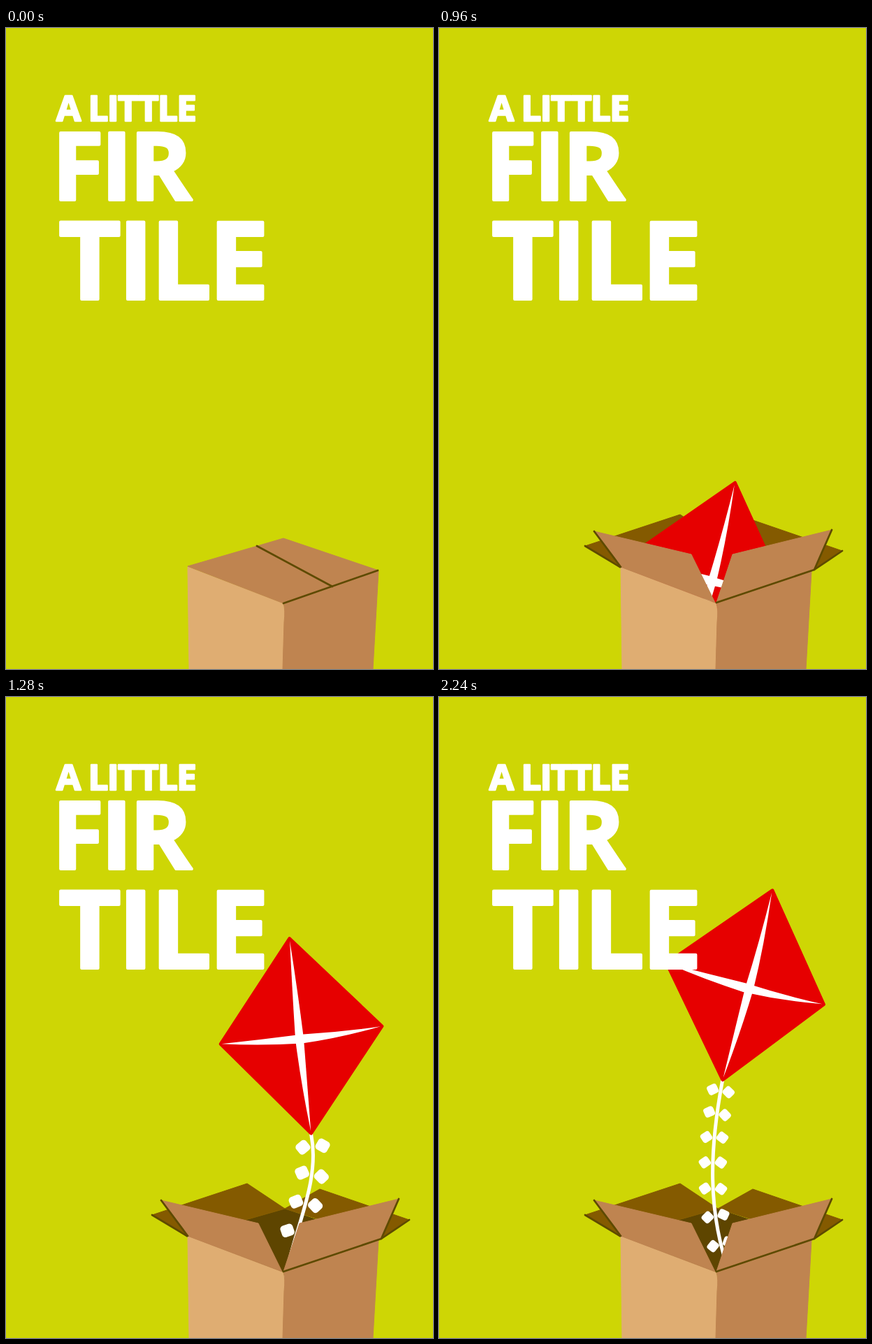
An HTML page for the animation above (2320 ms loop, 611 px wide and 917 px high).

```html
<!DOCTYPE html>
<html lang="en">
<head>
<meta charset="utf-8">
<title>Box and kite</title>
<style>
  html, body { margin: 0; width: 100%; height: 100%; overflow: hidden; background: #ced605; }
  svg { display: block; width: 100vw; height: 100vh; }
  text {
    font-family: "Open Sans", "Noto Sans", sans-serif; font-weight: 700; letter-spacing: -.03em;
    fill: #fff; stroke: #fff; stroke-width: 4; stroke-linejoin: round;
  }
  .light { fill: #dfad72; stroke: #dfad72; }
  .tan { fill: #bf8450; stroke: #bf8450; }
  .back { fill: #845a00; stroke: #845a00; }
  .dark { fill: #5e4500; }
  .edge { fill: none; stroke: #5e4a00; stroke-width: 2.7; stroke-linecap: round; }
  .string { fill: none; stroke: #fff; stroke-width: 5; stroke-linecap: round; }
  .sail { fill: #e60000; stroke: #e60000; stroke-width: 5; stroke-linejoin: round; }
</style>
</head>
<body>
<svg viewBox="0 0 611 917">
  <rect width="611" height="917" fill="#ced605"/>

  <g id="behind">
    <path class="dark" d="M259 772 399 732 534 777 396 823Z"/>
    <path id="backLeft" class="back"/>
    <path id="backRight" class="back"/>
    <path id="backEdges" class="edge"/>
  </g>

  <g id="toy">
    <path id="string" class="string"/>
    <g id="bows" fill="#fff"></g>
    <g id="kite">
      <path id="sail" class="sail"/>
      <path id="mast" fill="#fff"/>
      <path id="spar" fill="#fff" d="M-115 141Q-58 141 0 140Q58 143 114 141Q58 151 0 153Q-58 150 -115 141Z"/>
    </g>
  </g>

  <path class="light" d="M260 771 396 823Q400 832 398 850L396 917H262Z"/>
  <path class="tan" d="M397 823 533 777 525 917H396L398 850Q400 832 397 823Z"/>

  <g id="lid">
    <path class="tan" d="M260 770 397 730 533 776 397 823Z"/>
    <path class="edge" d="M359 741 467 799M397 823 532 776"/>
  </g>
  <g id="front">
    <path id="frontLeft" class="tan"/>
    <path id="frontRight" class="tan"/>
    <path id="frontEdges" class="edge"/>
  </g>

  <text x="72" y="133" font-size="51" style="stroke-width:2.5">A LITTLE</text>
  <text x="66" y="246" font-size="135">FIR</text>
  <text x="75" y="388" font-size="155">TILE</text>
</svg>
<script>
const LOOP = 2320, STEP = 80, OPEN_AT = 800, KITE_AT = 880;
const FLOOR = 830;      // depth inside the box where the tail ends
const LAST_BOW = 798;   // no bows are tied below this height
const $ = id => document.getElementById(id);
const show = (id, on) => $(id).setAttribute("visibility", on ? "visible" : "hidden");
const draw = (id, d) => $(id).setAttribute("d", d);

// time, crossing x, crossing y, tilt, tail scale, tail control x, tail control x, tail end x
const poses = [
  [880, 365, 885, 14, 1, 400, 400, 395],
  [960, 391, 791, 14.5, 1, 405, 402, 395],
  [1120, 452, 616, 14.5, 1, 411, 408, 395],
  [1280, 420, 489, -6.3, 1.23, 450, 412, 400],
  [1440, 433, 444, 10.7, 1, 392, 396, 425],
  [1640, 442, 421, 15, 1, 388, 384, 420],
  [1840, 444, 417, 14.7, 1, 388, 382, 418]
];

function slope(i, k) {
  const a = poses[i - 1], b = poses[i + 1];
  return a && b ? (b[k] - a[k]) / (b[0] - a[0]) : 0;
}

function poseAt(time) {
  const t = Math.min(time, poses.at(-1)[0]);
  let i = 0;
  while (i < poses.length - 2 && t > poses[i + 1][0]) i++;
  const a = poses[i], b = poses[i + 1], span = b[0] - a[0], u = (t - a[0]) / span;
  return a.map((v, k) =>
    v * (1 + 2 * u) * (1 - u) ** 2 + b[k] * u * u * (3 - 2 * u) +
    span * u * (1 - u) * (slope(i, k) * (1 - u) - slope(i + 1, k) * u)).slice(1);
}

function drawFlaps(open) {
  const tip = (x, y) => `${396 + (x - 396) * open} ${776 + (y - 776) * open}`;
  const backLeft = tip(209, 741), backRight = tip(577, 748);
  const frontLeft = tip(222, 720), frontRight = tip(562, 718);
  draw("backLeft", `M259 772 ${backLeft} ${tip(345, 696)} 399 732Z`);
  draw("backRight", `M399 732 ${tip(449, 704)} ${backRight} 537 775Z`);
  draw("backEdges", `M259 771 ${backLeft}M537 775 ${backRight}`);
  draw("frontLeft", `M260 771 ${frontLeft} ${tip(361, 753)} 395 822Z`);
  draw("frontRight", `M397 822 ${tip(420, 753)} ${frontRight} 537 775Z`);
  draw("frontEdges", `M260 771 ${frontLeft}M397 822 537 775 ${frontRight}`);
}

function drawTail(x, y, scale, x1, x2, x3) {
  const drop = (FLOOR - y) / 3;
  draw("string", `M${x} ${y}C${x1} ${y + drop} ${x2} ${y + 2 * drop} ${x3} ${FLOOR}`);
  const path = $("string");
  let bows = "";
  for (let i = 0; i < 9; i++) {
    const at = (14 + 32 * i + 0.8 * i * i) * scale;
    const p = path.getPointAtLength(at), q = path.getPointAtLength(at - 2);
    if (p.y > LAST_BOW) break;
    const turn = Math.atan2(q.x - p.x, p.y - q.y) * 180 / Math.PI + 4 * Math.sin(i * 2);
    const knot = (side, angle) =>
      `<rect x="-7.5" y="-7" width="15" height="14" rx="4" transform="translate(${side * 11.5} 0) rotate(${angle})"/>`;
    bows += `<g transform="translate(${p.x} ${p.y}) rotate(${turn}) scale(${scale})">${knot(-1, -35)}${knot(1, 35)}</g>`;
  }
  $("bows").innerHTML = bows;
}

function drawKite(time) {
  const [x, y, tilt, ...tail] = poseAt(time);
  const bend = tilt * 0.25, angle = tilt * Math.PI / 180;
  $("kite").setAttribute("transform", `translate(${x} ${y}) rotate(${tilt}) translate(${-bend} -146)`);
  draw("sail", `M0 2 ${116 - bend} 141 0 282 ${-116 - bend} 141Z`);
  $("spar").setAttribute("transform", `translate(${-bend} 0)`);
  draw("mast", `M0 5Q${bend + 5} 80 ${bend + 6} 146Q${bend + 4} 210 0 279` +
    `Q${bend - 5} 210 ${bend - 6} 146Q${bend - 3} 80 0 5Z`);
  const footX = x - bend * Math.cos(angle) - 138 * Math.sin(angle);
  const footY = y - bend * Math.sin(angle) + 138 * Math.cos(angle);
  if (footY < FLOOR) drawTail(footX, footY, ...tail);
  else {
    draw("string", "");
    $("bows").innerHTML = "";
  }
}

function render(now) {
  const time = Math.floor(now % LOOP / STEP) * STEP;
  const open = time >= OPEN_AT, flying = time >= KITE_AT;
  show("lid", !open);
  show("behind", open);
  show("front", open);
  show("toy", flying);
  if (open) drawFlaps(flying ? 1 : 0.55);
  if (flying) drawKite(time);
}

const start = performance.now();
function tick() {
  render(performance.now() - start);
  requestAnimationFrame(tick);
}
tick();
</script>
</body>
</html>
```
